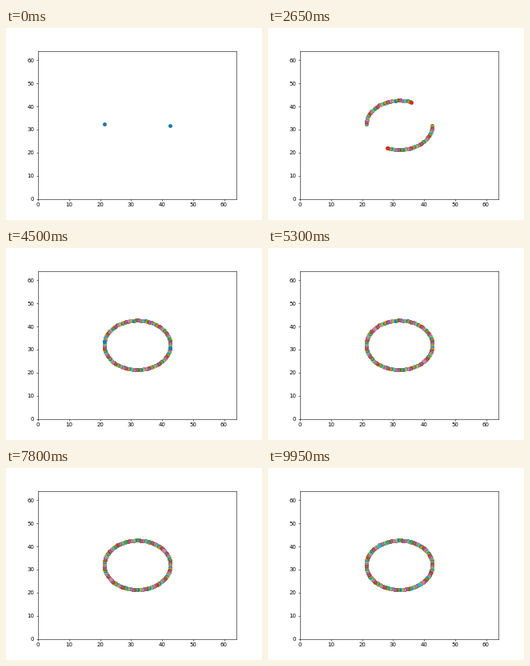
Recreate the animation shown at these times as a matplotlib script. Size 320 by 240 pixels, loop 10 s.

```python
import numpy as np
import matplotlib.pyplot as plt
from matplotlib.animation import FuncAnimation

SIZE = 64
CENTER = SIZE / 2
RADIUS = SIZE / 6
OMEGA = 0.036  # radians per step
STEPS = 200

fig, ax = plt.subplots(figsize=(6.4, 4.8), dpi=50)
ax.set_xlim(0, SIZE)
ax.set_ylim(0, SIZE)


def pair(step):
    """Positions of the two bodies, on opposite sides of the circle."""
    angle = np.pi - OMEGA * (step + 1)
    angles = np.array([angle, angle + np.pi])
    return CENTER + RADIUS * np.cos(angles), CENTER + RADIUS * np.sin(angles)


# One pair of dots per step; the colour cycle advances with each pair.
trail = [ax.plot(*pair(step), "o")[0] for step in range(STEPS)]


def update(step):
    for i, dots in enumerate(trail):
        dots.set_visible(i <= step)
    return trail


anim = FuncAnimation(fig, update, frames=STEPS, interval=50, repeat=True,
                     repeat_delay=0, blit=False)
plt.show()
```
